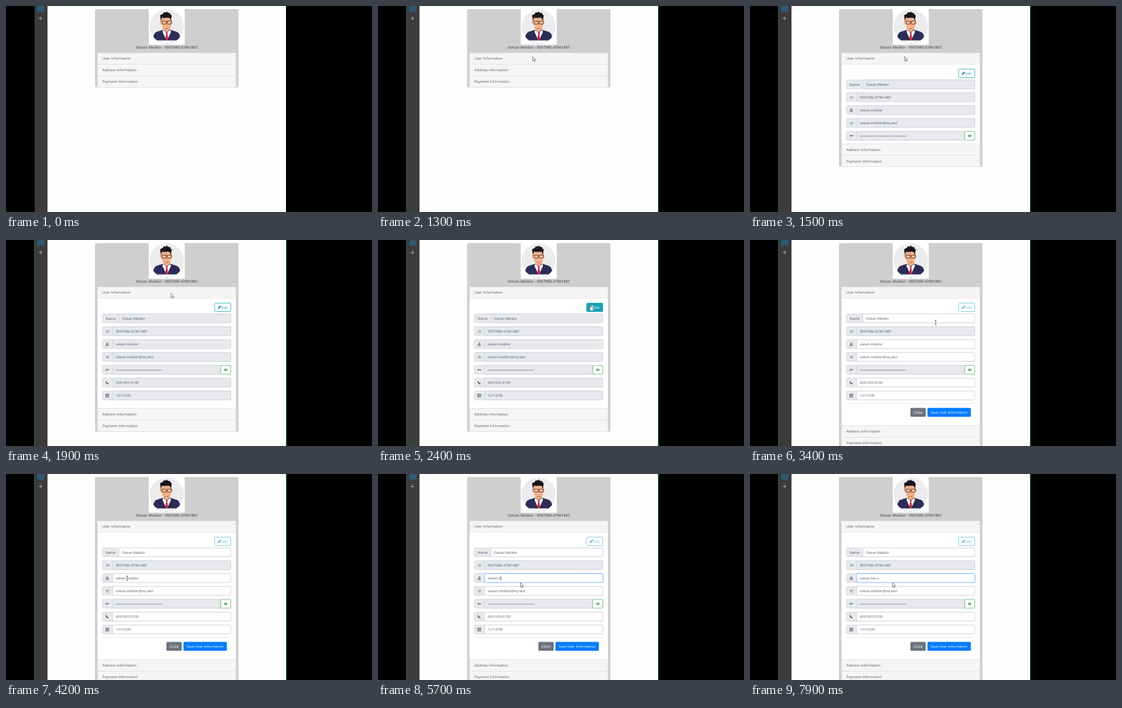
Recreate the animation shown at these times as an HTML page. Size 600 px wide and 338 px high, loop 8000 ms.

```html
<!DOCTYPE html>
<html lang="en">
<head>
<meta charset="utf-8">
<title>Profile card</title>
<style>
  html, body { margin: 0; width: 100%; height: 100%; overflow: hidden; background: #000; }
  svg { display: block; width: 100vw; height: 100vh; }
  text { font: 5.85px "Open Sans", "Noto Sans", sans-serif; fill: #555b61; text-rendering: geometricPrecision; }
  .title { font-size: 6.13px; font-weight: 700; fill: #6b6d70; text-anchor: middle; }
  .mid { text-anchor: middle; }
  .header { fill: #f5f5f5; stroke: #dedede; stroke-width: .7; }
  .gray { fill: #e7e9ed; stroke: #cbd0d6; stroke-width: .8; }
  .input { stroke: #cbd0d6; stroke-width: .8; }
  .icon { fill: none; stroke: #555b61; stroke-width: .8; }
</style>
</head>
<body>
<svg viewBox="0 0 600 338" preserveAspectRatio="none">
  <defs>
    <clipPath id="bodyClip"><rect id="bodyArea" x="150" y="95.5" width="227" height="0"/></clipPath>
    <clipPath id="portrait"><circle cx="263.5" cy="33.5" r="28"/></clipPath>
  </defs>
  <rect width="600" height="338"/>
  <rect x="47" width="21" height="338" fill="#3d3b3c"/>
  <rect x="51" width="12" height="9.5" fill="#2f5873"/>
  <path d="M53.5 20.5h6.4M56.7 17.3v6.4" stroke="#bbb" stroke-width=".8"/>
  <rect x="68" width="391" height="338" fill="#fefefe"/>
  <path id="edges" d="M46.5 0V338M459.5 0V338" stroke="#1d6b4a" stroke-width="1"/>

  <rect id="card" x="146" y="5" width="235" rx="2" fill="#cfcfcf"/>
  <rect x="234" y="4.5" width="59" height="59" fill="#fff"/>
  <g clip-path="url(#portrait)">
    <rect x="234" y="4" width="60" height="60" fill="#ececee"/>
    <path d="M259 35h10v10l-5 5-5-5z" fill="#e39a70"/>
    <path d="M241 62c0-13 1-18 7-20l10-3 5.500 4 5.500-4 10 3c6 2 7 7 7 20z" fill="#2b2d58"/>
    <path d="M257.500 39.500l6 4 6-4 1 3-7 15-7-15z" fill="#fff"/>
    <path d="M262 43h3.200l-.7 3 1.500 8-2.500 4-2.500-4 1.500-8z" fill="#d4283f"/>
    <path d="M234 56.500h60v8h-60z" fill="#fff"/>
    <path d="M252.500 25h2v-6h16v6h2.500q.5 5-2.500 6-1.500 10-7.500 10.500-6-.5-7.500-10.500-3.500-1-3-6z" fill="#f4b086"/>
    <path d="M254 27l-1-9q-1-2 0-3l4-2 2-3 2 1 3-2 1 2 5 1-1 1 3 3-1 3-.5 8-1.500-7-4-1q-5 1-9 0l-1.500 3z" fill="#17161b"/>
    <path d="M255.500 25h7v4.500h-6zM264.500 25h7l-1 4.500h-6zM262 26h3" fill="#f8c9a5" stroke="#6b3b2b" stroke-width="1"/>
    <path d="M260.500 36.500q3 1.500 6 0" fill="none" stroke="#b5583e" stroke-width=".9"/>
  </g>
  <text class="title" x="263.5" y="70.3">Oskan Meldor - 9507980.47961887</text>

  <rect class="header" x="150" y="77" width="227" height="18.5"/>
  <text x="158" y="88.100">User Information</text>
  <g clip-path="url(#bodyClip)">
    <rect x="150" y="95.5" width="227" height="243" fill="#fff"/>
    <g id="edit">
      <rect x="342" y="103.500" width="26.500" height="14" rx="1.500" fill="#fff" stroke="#17a2b8" stroke-width=".8"/>
      <rect id="editFill" x="342" y="103.500" width="26.500" height="14" rx="1.500" fill="#17a2b8"/>
      <g id="editLabel">
        <path d="M347 113.300l.6-2.200 3.700-3.700 1.600 1.600-3.700 3.700z"/>
        <text x="353" y="112.600" style="fill:inherit">Edit</text>
      </g>
    </g>
    <g id="rows"></g>
    <g id="footer">
      <path d="M158 268.500H368.500" stroke="#e2e2e2" stroke-width=".8"/>
      <rect x="263" y="275.500" width="25" height="14.500" rx="1.500" fill="#6c757d"/>
      <rect x="291" y="275.500" width="71" height="14.500" rx="1.500" fill="#007bff"/>
      <text class="mid" x="275.500" y="284.900" style="fill:#fff">Close</text>
      <text class="mid" x="326.500" y="284.900" style="fill:#fff">Save User Information</text>
    </g>
  </g>
  <g id="lower">
    <rect class="header" x="150" y="95.5" width="227" height="19"/>
    <rect class="header" x="150" y="114.500" width="227" height="18.700"/>
    <text x="158" y="107.200">Address Information</text>
    <text x="158" y="126.300">Payment Information</text>
  </g>

  <g id="cursor">
    <path id="arrow" d="M0 0v7l1.600-1.400 1.200 2.600 1-.5-1.100-2.500h2.200z" fill="#fff" stroke="#333" stroke-width=".6"/>
    <path id="hand" d="M1 0q1-.6 1.300.5v3l3 .7q1 .4.8 1.600l-.6 3.200h-3.800l-2.200-3.500q.2-1.200 1.500 0z" fill="#fff" stroke="#333" stroke-width=".5"/>
    <path id="beam" d="M-1.500-3.500h3M0-3.500v7M-1.500 3.500h3" fill="none" stroke="#444" stroke-width=".7"/>
  </g>
</svg>
<script>
const $ = id => document.getElementById(id);
const LOOP = 8000, TICK = 100, USER = 'oskan.meldor', PREFIX = 'oskan.', TEXT_X = 180;

const icons = {
  user: '<circle cx="166" cy="-1" r="1.300"/><path d="M163.700 2.500q0-2 2.300-2t2.300 2z"/>',
  key: '<path d="M165 0h4" stroke-width="1.200"/><circle cx="164.500" cy="0" r="1"/>',
  phone: '<path d="M164.200-2.200q-.3 3.800 4 4.200" stroke-width="1.700"/>',
  calendar: '<path d="M163.500-2.300h5v5h-5zM163.500-1.300h5M164.500.3h3M164.500 1.500h2"/>'
};
const fields = [
  { label: 'Name', value: 'Oskan Meldor', editable: true, split: 185 },
  { label: 'ID', value: '9507980.47961887' },
  { icon: 'user', value: USER, editable: true, id: 'username' },
  { label: '@', value: USER + '@nq.test', editable: true },
  { icon: 'key', value: '*'.repeat(29), secret: true },
  { icon: 'phone', value: '000-555-0100', editable: true },
  { icon: 'calendar', value: '12/12/00', editable: true }
];

const fieldRow = ({ label, icon, value, editable, secret, split = 175, id = '' }, i) => {
  const right = secret ? 352 : 368.5;
  const prefix = label
    ? `<text class="mid" x="${(158 + split) / 2}" y="2.1">${label}</text>`
    : `<g class="icon">${icons[icon]}</g>`;
  const eye = `<rect x="352" y="-7.200" width="16.500" height="14.400" rx="1.500" fill="#fff" stroke="#4fae68" stroke-width=".8"/>
    <path d="M357 0q3.200-4 6.400 0-3.200 4-6.400 0z" fill="#389a54"/><circle cx="360.200" cy="0" r=".8" fill="#fff"/>`;
  const extras = id && `<rect id="selection" x="0" y="-5.200" height="10.500" fill="#3297fd"/>`;
  return `<g transform="translate(0 ${128.5 + i * 21.1})">
    <rect class="gray" x="158" y="-7.200" width="${right - 158}" height="14.400" rx="1.500"/>
    <rect ${id && 'id="focusGlow"'} class="input" data-editable="${!!editable}" x="${split}" y="-7.200"
      width="${right - split}" height="14.400" rx="1"/>
    ${prefix}${extras}
    <text ${id && `id="${id}"`} x="${split + 5}" y="${secret ? 2.6 : 2.1}" ${secret ? 'style="font-size:4.75px"' : ''}>${value}</text>
    ${id && '<path id="caret" stroke="#333" stroke-width=".6"/>'}${secret ? eye : ''}</g>`;
};
$('rows').innerHTML = fields.map(fieldRow).join('');
const inputs = [...document.querySelectorAll('.input')];
const glow = $('focusGlow').cloneNode();
glow.id = 'ring';
glow.setAttribute('class', '');
glow.setAttribute('style', 'fill:none;stroke:#bfdeff;stroke-width:2.4');
$('focusGlow').before(glow);

// Piecewise linear interpolation over [time, ...values] keys.
const track = (keys, t) => {
  const n = keys.findIndex(k => k[0] > t);
  if (n === 0) return keys[0].slice(1);
  if (n < 0) return keys.at(-1).slice(1);
  const a = keys[n - 1], b = keys[n], p = (t - a[0]) / (b[0] - a[0]);
  return a.slice(1).map((v, i) => v + (b[i + 1] - v) * p);
};

// CSS "ease": cubic-bezier(.25, .1, .25, 1)
const ease = x => {
  if (x <= 0) return 0;
  if (x >= 1) return 1;
  let lo = 0, hi = 1, s;
  for (let i = 0; i < 20; i++) {
    s = (lo + hi) / 2;
    const bx = .75 * s * (1 - s) + s ** 3;
    if (bx < x) lo = s; else hi = s;
  }
  return .3 * s * (1 - s) ** 2 + 3 * s * s * (1 - s) + s ** 3;
};

const pointerPath = [
  [100, 274, 77.5], [1200, 274, 77.5], [1300, 253.5, 83], [1800, 253.5, 83],
  [2100, 305, 97], [2400, 347, 107], [3100, 347, 107], [3500, 290, 145],
  [4000, 203, 173], [4200, 198.5, 171], [4300, 198.5, 171], [4700, 233.5, 178.5]
];
const hoverFill = [[2200, 0], [2300, .5], [2400, 1], [2600, 1], [2700, .8], [2800, .45], [2900, .15], [3000, 0]];
const typing = [[5700, 'h'], [6300, 'he'], [6500, 'hev'], [6900, 'hev.'], [7400, 'hev.s']];

const show = (id, on) => $(id).style.display = on ? '' : 'none';

function draw(t) {
  const editing = t >= 2700, focused = t >= 4300;
  const open = editing ? 209 : 181 * ease((t - 1350) / 350);
  $('card').setAttribute('height', 128.5 + open);
  $('bodyArea').setAttribute('height', open);
  $('lower').setAttribute('transform', `translate(0 ${open})`);
  show('edges', t >= 1300);
  show('footer', editing);

  const [fill] = track(hoverFill, t);
  $('editFill').style.opacity = fill;
  $('editLabel').style.fill = fill > .4 ? '#fff' : '#1795b8';
  $('edit').style.opacity = editing ? .65 : 1;

  for (const el of inputs) el.style.fill = editing && el.dataset.editable === 'true' ? '#fff' : '#e7e9ed';
  $('focusGlow').style.stroke = focused ? '#80bdff' : '';
  show('ring', focused);

  const [x, y] = track(pointerPath, t);
  drawUsername(t, x);

  $('cursor').setAttribute('transform', `translate(${x} ${y})`);
  const hand = t >= 2300 && t < 3000, beam = t >= 3400 && t < 4700;
  show('hand', hand);
  show('beam', beam);
  show('arrow', t >= 100 && !hand && !beam);
}

function drawUsername(t, pointerX) {
  const el = $('username'), typed = typing.findLast(([at]) => t >= at);
  const value = typed ? PREFIX + typed[1] : USER;
  el.textContent = value;
  const widthTo = n => el.getSubStringLength(0, n);

  const dragging = t >= 4300 && !typed;
  let end = PREFIX.length;
  while (dragging && end < value.length && TEXT_X + widthTo(end + 1) <= pointerX + 1) end++;
  const selecting = end > PREFIX.length;
  show('selection', selecting);
  if (selecting) {
    const start = widthTo(PREFIX.length);
    $('selection').setAttribute('x', TEXT_X + start);
    $('selection').setAttribute('width', widthTo(end) - start);
    el.innerHTML = `${PREFIX}<tspan fill="#fff" style="fill:#fff">${value.slice(PREFIX.length, end)}</tspan>${value.slice(end)}`;
  }

  const caretOn = typed && !(t >= 6200 && t < 6300) && t < 7900;
  show('caret', caretOn);
  if (caretOn) $('caret').setAttribute('d', `M${TEXT_X + widthTo(value.length) + .4} -4.2v8.400`);
}

function frame() {
  const t = performance.now() % LOOP;
  draw(Math.floor(t / TICK) * TICK);
  requestAnimationFrame(frame);
}
frame();
</script>
</body>
</html>
```
